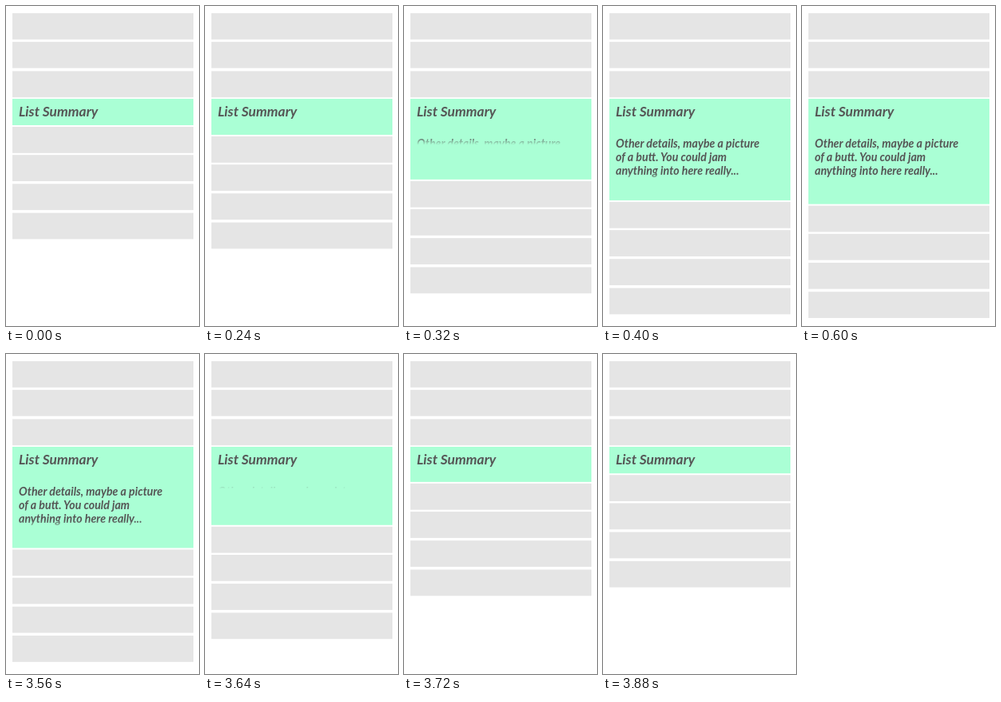
Recreate the animation shown at these times as an HTML page. Size 242 px wide and 400 px high, loop 4.68 s.

```html
<!DOCTYPE html>
<html lang="en">
<head>
<meta charset="utf-8">
<title>Expanding list item</title>
<style>
  html, body { margin: 0; width: 100%; height: 100%; overflow: hidden; background: #fff; }
  svg { display: block; width: 100vw; height: 100vh; }
  text { font: italic 700 14.2px Lato, sans-serif; fill: #555; }
  .title { font-size: 17.4px; }
</style>
</head>
<body>
<svg viewBox="0 0 242 400">
  <defs>
    <linearGradient id="fade" gradientUnits="userSpaceOnUse" x1="0" x2="0" y1="163" y2="173">
      <stop offset="0" stop-color="#fff"/>
      <stop offset="1" stop-color="#fff" stop-opacity="0"/>
    </linearGradient>
    <mask id="reveal" maskUnits="userSpaceOnUse" x="0" y="0" width="242" height="400">
      <rect width="242" height="400" fill="url(#fade)"/>
    </mask>
  </defs>
  <g id="above" fill="#e5e5e5"></g>
  <g id="below" fill="#e5e5e5"></g>
  <rect id="panel" x="8" y="116" width="227" height="33" fill="#aaffd5"/>
  <text class="title" x="16" y="138">List Summary</text>
  <g mask="url(#reveal)">
    <text x="16" y="177.3">Other details, maybe a picture</text>
    <text x="16" y="194.3">of a butt. You could jam</text>
    <text x="16" y="211.3">anything into here really...</text>
  </g>
</svg>
<script>
const LOOP = 4680, STEP = 40, DURATION = 588;
const OPEN_AT = 6, CLOSE_AT = 3362, LAST_STEP = 3880;
const ROW_HEIGHT = 32.8, GROWTH = 98.6;
const el = id => document.getElementById(id);
const panel = el('panel'), below = el('below'), fade = el('fade');

function addRows(group, tops) {
  for (const y of tops) {
    const row = document.createElementNS('http://www.w3.org/2000/svg', 'rect');
    const box = { x: 8, y, width: 227, height: ROW_HEIGHT };
    for (const key in box) row.setAttribute(key, box[key]);
    group.append(row);
  }
}

function easeInOutExpo(s) {
  if (s <= 0) return 0;
  if (s >= 1) return 1;
  return s < 0.5 ? 2 ** (20 * s - 11) : 1 - 2 ** (9 - 20 * s);
}

function openness(t) {
  if (t < 80) return 0;
  // The closing motion rests just short of its end until the loop restarts.
  t = Math.min(Math.floor(t / STEP) * STEP, LAST_STEP);
  if (t < 3440) return easeInOutExpo((t - OPEN_AT) / DURATION);
  return 1 - easeInOutExpo((t - CLOSE_AT) / DURATION);
}

function draw(t) {
  const shift = GROWTH * openness(t);
  const edge = 173 + 1.75 * (shift - 67.5);
  panel.setAttribute('height', 33 + shift);
  below.setAttribute('transform', `translate(0 ${shift})`);
  fade.setAttribute('y1', edge - 10);
  fade.setAttribute('y2', edge);
}

addRows(el('above'), [9, 44.8, 81.4]);
addRows(below, [151, 186.2, 222.3, 258.6]);

const start = performance.now();
function tick() {
  draw((performance.now() - start) % LOOP);
  requestAnimationFrame(tick);
}
tick();
</script>
</body>
</html>
```
